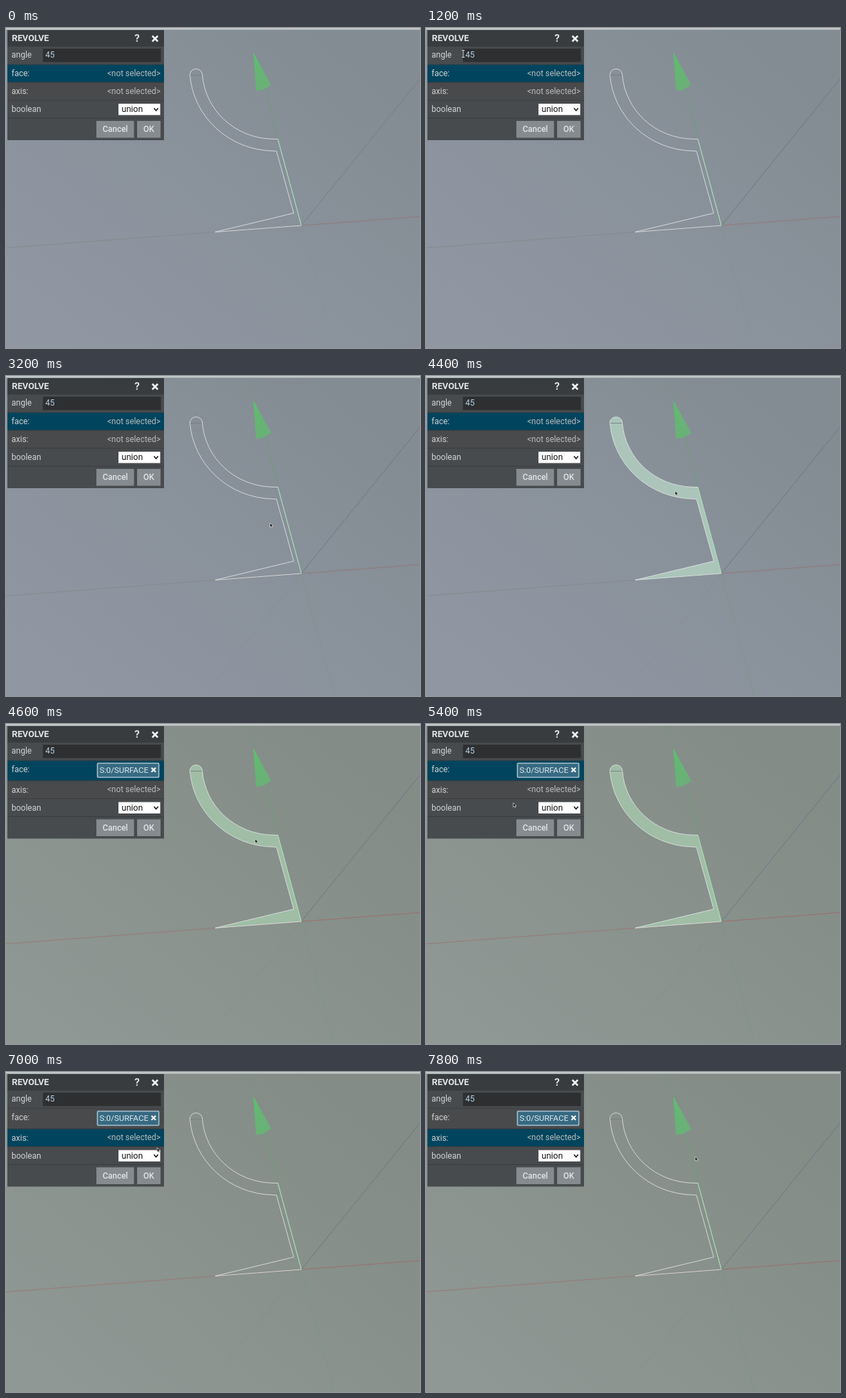
Animation of 600x465 px, one loop 8000 ms. Source, as an HTML page:

```html
<!DOCTYPE html>
<html>
<head>
<meta charset="utf-8">
<style>
  html, body { margin: 0; width: 100%; height: 100%; overflow: hidden; background: #8a929b; }
  svg { display: block; width: 600px; height: 465px; font: 12px Roboto, Arial, sans-serif; }
  text { fill: #d2d3d4; }
  .bold { font-weight: 500; fill: #e2e4e4; }
  .end { text-anchor: end; fill: #b9bcbd; font-size: 11.9px; }
  .mid { text-anchor: middle; }
  .cross { fill: none; stroke: #f0f0f0; }
  .line { fill: none; stroke-width: .9; }
</style>
</head>
<body>
<svg viewBox="0 0 600 465">
  <defs>
    <linearGradient id="cool" x1=".1" y1=".95" x2=".9" y2=".2">
      <stop offset="0" stop-color="#9097a3"/>
      <stop offset=".5" stop-color="#8a929c"/>
      <stop offset="1" stop-color="#848c93"/>
    </linearGradient>
    <linearGradient id="warm" x1=".1" y1=".95" x2=".9" y2=".2">
      <stop offset="0" stop-color="#8f9894"/>
      <stop offset=".5" stop-color="#89928d"/>
      <stop offset="1" stop-color="#838c87"/>
    </linearGradient>
  </defs>

  <rect id="back" width="600" height="465"/>
  <rect width="600" height="2.5" fill="#c1c8c7"/>

  <g class="line">
    <path id="redLeft" d="M0 319.5L428 287"/>
    <path id="redRight" d="M428 287L600 274"/>
    <path id="blue" d="M428 287L600 74"/>
    <path id="blueBack" d="M428 287L304 441" stroke="#66707f"/>
    <path id="greenTop" d="M351 2L360 37" stroke="#6a9f76"/>
    <path d="M376 88L394 161" stroke="#6aa276"/>
    <path id="greenLow" d="M428 287L476 465" stroke="#6a9f76"/>
  </g>
  <path d="M359 37L363 91L371 90.5L384 83Z" fill="#6eac7b"/>
  <path id="fan" class="line" stroke="#60bd70" stroke-width=".6"/>

  <path id="face" stroke="#e2e6e5" stroke-width=".85" stroke-linejoin="round"
    d="M284.5 68A9 8.5 0 0 0 266.5 68A123 120 0 0 0 386 178.6L392 179L417 269L303 296.5L428 287L394 161.5L386 161.3A104 101 0 0 1 284.5 68Z"/>
  <path class="line" stroke="#777f84" d="M267 68.5H284"/>
  <path class="line" stroke="#93dd9f" d="M394 161.5L428 287"/>

  <rect id="panel" x="2" y="3" width="227" fill="#484b4d"/>
  <rect x="2" y="3" width="227" height="24" fill="#393c3f"/>
  <text class="bold" x="8.5" y="19" font-size="12.8" style="font-weight:700">REVOLVE</text>
  <text class="bold" x="190" y="20.3" font-size="15" text-anchor="middle" style="font-weight:700">?</text>
  <path class="cross" stroke-width="2.5" d="M212 11.5L220 19.5M220 11.5L212 19.5"/>
  <text x="8" y="43">angle</text>
  <rect x="53.5" y="30" width="171" height="19.5" fill="#2e2f31"/>
  <text x="57" y="43" style="fill:#b5d0df">45</text>
  <path stroke="#3a3c3e" d="M2 53H229"/>
  <rect id="faceRow" x="2" y="53.5" width="227"/>
  <text x="8" y="70">face:</text>
  <text id="noFace" class="end" x="224" y="69.8">&lt;not selected&gt;</text>
  <g id="chip">
    <rect x="132.5" y="57" width="89" height="20.5" rx="1" fill="#366a82" stroke="#a5c1ce" stroke-width="1.6"/>
    <text x="135.5" y="71" font-size="11.8" style="fill:#e1e9ec">S:0/SURFACE</text>
    <path class="cross" stroke-width="2.3" d="M210.8 63.5L217 69.7M217 63.5L210.8 69.7"/>
  </g>
  <g id="lower">
    <rect id="axisRow" x="2" y="79.5" width="227" height="25.5"/>
    <text x="8" y="96">axis:</text>
    <text class="end" x="224" y="95.8">&lt;not selected&gt;</text>
    <path stroke="#3a3c3e" d="M2 79H229M2 105H229M2 131H229"/>
    <text x="8" y="122">boolean</text>
    <rect x="163" y="110" width="60.5" height="16.5" fill="#fff"/>
    <text x="167.5" y="122" font-size="12.5" style="fill:#111">union</text>
    <path class="line" stroke="#111" style="stroke-width:1.5" d="M214.5 116.5L217.5 120L220.5 116.5"/>
    <rect x="131" y="135" width="54.5" height="24.5" fill="#858b8f"/>
    <rect x="190" y="135" width="34" height="24.5" fill="#858b8f"/>
    <text class="bold mid" x="158.3" y="151">Cancel</text>
    <text class="bold mid" x="207" y="151">OK</text>
  </g>

  <g id="cursor">
    <path id="arrow" d="M0 0V6.2L1.5 5L2.6 7L3.6 6.4L2.7 4.6H4.8Z" fill="#16181a" stroke="#e4e6e6" stroke-width=".7"/>
    <path id="beam" class="line" stroke="#e8eaea" d="M-2 -5.5H2M0 -5.5V4.5M-2 4.5H2"/>
  </g>
</svg>
<script>
const el = {};
document.querySelectorAll('[id]').forEach(node => el[node.id] = node);
const set = (name, attrs) => {
  for (const key in attrs) el[name].setAttribute(key, attrs[key]);
};
const show = (name, on) => set(name, { visibility: on ? 'visible' : 'hidden' });

let rays = '';
for (let i = 0; i <= 8; i++) {
  const k = i / 8;
  rays += `M359 37L${363 + 21 * k} ${91 - 8 * k * k}`;
}
set('fan', { d: rays });

// time, x, y of the pointer tip
const route = [
  [400, 130, 39], [1200, 54, 38], [2400, 340, 195], [3200, 382.5, 213.5],
  [3600, 376, 196], [4200, 376, 196], [4400, 361, 167], [4800, 361, 167],
  [5600, 48, 97], [6400, 48, 97], [7600, 390, 123], [8000, 390, 123]
];

function pointerAt(t) {
  const i = Math.max(1, route.findIndex(p => p[0] >= t));
  const [a, b] = [route[i - 1], route[i]];
  const k = Math.max(0, (t - a[0]) / (b[0] - a[0]));
  return [a[1] + (b[1] - a[1]) * k, a[2] + (b[2] - a[2]) * k];
}

function draw(now) {
  const t = Math.floor(now % 8000 / 200) * 200;
  const picked = t >= 4600, axisActive = t >= 6000;
  const shift = picked ? 3.5 : 0;
  const active = '#00445d', idle = '#484a4c';

  set('back', { fill: picked ? 'url(#warm)' : 'url(#cool)' });
  set('redLeft', { stroke: picked ? '#9c7473' : '#87878a' });
  set('redRight', { stroke: picked ? '#a06868' : '#917775' });
  set('blue', { stroke: t < 200 ? '#777b81' : '#6b7485' });
  set('blueBack', { opacity: t < 1400 ? 0 : .15 });
  set('greenTop', { opacity: t < 1400 ? 0 : .6 });
  set('greenLow', { opacity: t < 200 ? .05 : t < 1400 ? .35 : .6 });
  set('face', { fill: t < 4400 || axisActive ? 'none' : picked ? '#a0bda6' : '#abc5ba' });

  set('panel', { height: 160 + shift });
  set('faceRow', { fill: axisActive ? idle : active, height: 25.5 + shift });
  set('axisRow', { fill: axisActive ? active : idle });
  set('lower', { transform: `translate(0 ${shift})` });
  show('noFace', !picked);
  show('chip', picked);

  const [x, y] = pointerAt(t);
  const typing = x < 225 && y > 30 && y < 50;
  set('cursor', { transform: `translate(${x} ${y})` });
  show('arrow', t >= 400 && !typing);
  show('beam', t >= 400 && typing);
}

const start = performance.now();
function tick() {
  draw(performance.now() - start);
  requestAnimationFrame(tick);
}
tick();
</script>
</body>
</html>
```
